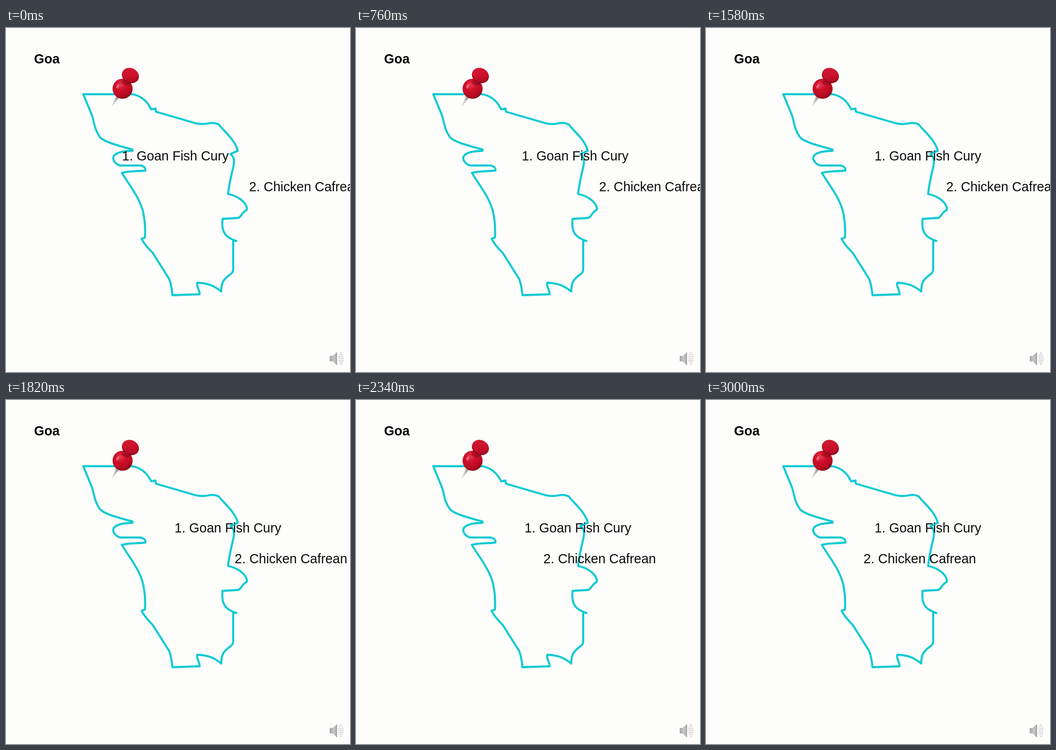
Animation of 748x748 px, one loop 3030 ms. Source, as an HTML page:

```html
<!DOCTYPE html>
<html lang="en">
<head>
<meta charset="utf-8">
<title>Goa dishes</title>
<style>
  html, body { margin: 0; width: 100%; height: 100%; overflow: hidden; background: #fdfdfb; }
  svg { display: block; width: 100vw; height: 100vh; }
  text { font: 28.6px "Liberation Sans", Arial, sans-serif; fill: #0c0c0c; }
  .title { font-weight: bold; fill: #000; }
  .border { fill: none; stroke-linejoin: round; stroke-linecap: round; }
</style>
</head>
<body>
<svg viewBox="0 0 748 748">
  <defs>
    <radialGradient id="ball" cx=".4" cy=".3" r=".75">
      <stop offset="0" stop-color="#e63a50"/>
      <stop offset=".35" stop-color="#cf1029"/>
      <stop offset=".75" stop-color="#b80a22"/>
      <stop offset="1" stop-color="#780616"/>
    </radialGradient>
    <linearGradient id="cap" x1="0" y1="0" x2=".8" y2="1">
      <stop offset="0" stop-color="#d21c35"/>
      <stop offset=".6" stop-color="#cb112b"/>
      <stop offset="1" stop-color="#a80a20"/>
    </linearGradient>
    <linearGradient id="neck">
      <stop offset="0" stop-color="#c5122b"/>
      <stop offset="1" stop-color="#850818"/>
    </linearGradient>
    <linearGradient id="needle">
      <stop offset="0" stop-color="#e4e4e0"/>
      <stop offset=".5" stop-color="#c2c2be"/>
      <stop offset="1" stop-color="#77777a"/>
    </linearGradient>
    <linearGradient id="cone">
      <stop offset="0" stop-color="#a2a2a4"/>
      <stop offset=".6" stop-color="#c9c9cb"/>
      <stop offset="1" stop-color="#a9a9ac"/>
    </linearGradient>
    <path id="coast" d="M168 144H275C290 147 302 155 310 167L316 177 325 175 326 182
      412 207Q425 210 437 208 452 204 463 210C471 222 498 242 504 267L488 274
      C497 281 497 290 494 303Q485 340 483 361C500 364 521 376 524 392L523 396
      C512 401 513 410 505 413L471 415C468 440 474 455 501 463L494 462V522
      C495 536 485 535 477 545Q468 553 468 573C452 560 440 555 416 554
      C413 562 421 568 421 579L362 581Q360 560 355 546L319 489Q300 470 295 458
      L302 456Q304 430 299 404C292 370 270 345 252 315C265 311 285 312 303 310
      Q305 302 293 299H248C238 296 233 288 233 282C236 270 255 268 275 267V264
      C240 255 212 247 204 237C192 220 192 205 187 190Z"/>
  </defs>

  <rect width="748" height="748" fill="#fdfdfb"/>
  <g class="border">
    <use href="#coast" stroke="#c9f3f4" stroke-width="6.5"/>
    <use href="#coast" stroke="#04c8d1" stroke-width="3.8"/>
  </g>

  <g>
    <path d="M239 148L246 151 231 170 229.500 171Z" fill="url(#needle)"/>
    <circle cx="253.500" cy="132" r="21.800" fill="url(#ball)"/>
    <path d="M256 109L272 117 268 124Q258 126 250 119Z" fill="url(#neck)"/>
    <ellipse cx="270.500" cy="103.500" rx="19" ry="16" transform="rotate(24 270.500 103.500)" fill="#8e0a1c"/>
    <ellipse cx="270.500" cy="102" rx="18" ry="14.800" transform="rotate(24 270.500 102)" fill="url(#cap)"/>
    <ellipse cx="243" cy="127" rx="3" ry="5" transform="rotate(25 243 127)" fill="#ee8290" opacity=".65"/>
  </g>

  <g>
    <path d="M704 713H710L719 705.500V733L710 725H704Z" fill="url(#cone)"/>
    <path d="M719 705.500V733" stroke="#98989b" stroke-width="1.500"/>
    <g fill="none" stroke="#cfcfd2" stroke-width="2.500" stroke-dasharray="3 1.500">
      <path d="M723 713Q727 719 723 726"/>
      <path d="M725 709Q732 719 725 730"/>
      <path d="M727 705Q738 719 727 734"/>
    </g>
  </g>

  <text class="title" x="61" y="77">Goa</text>
  <text id="fish" y="288">1. Goan Fish Cury</text>
  <text id="chicken" y="354.500">2. Chicken Cafrean</text>
</svg>

<script>
  const LOOP = 3030;
  const GLIDE = 1580;
  const labels = [
    { id: "fish", start: -633, from: 191.5, to: 366.5 },
    { id: "chicken", start: 1397, from: 528.5, to: 342.5 }
  ].map(l => ({ ...l, node: document.getElementById(l.id) }));

  const ease = u => (1 - Math.cos(Math.PI * Math.min(1, Math.max(0, u)))) / 2;

  function draw(now) {
    const t = now % LOOP;
    for (const { node, start, from, to } of labels) {
      const x = from + (to - from) * ease((t - start) / GLIDE);
      node.setAttribute("x", x.toFixed(2));
    }
  }

  function tick() {
    draw(performance.now());
    requestAnimationFrame(tick);
  }
  tick();
</script>
</body>
</html>
```
